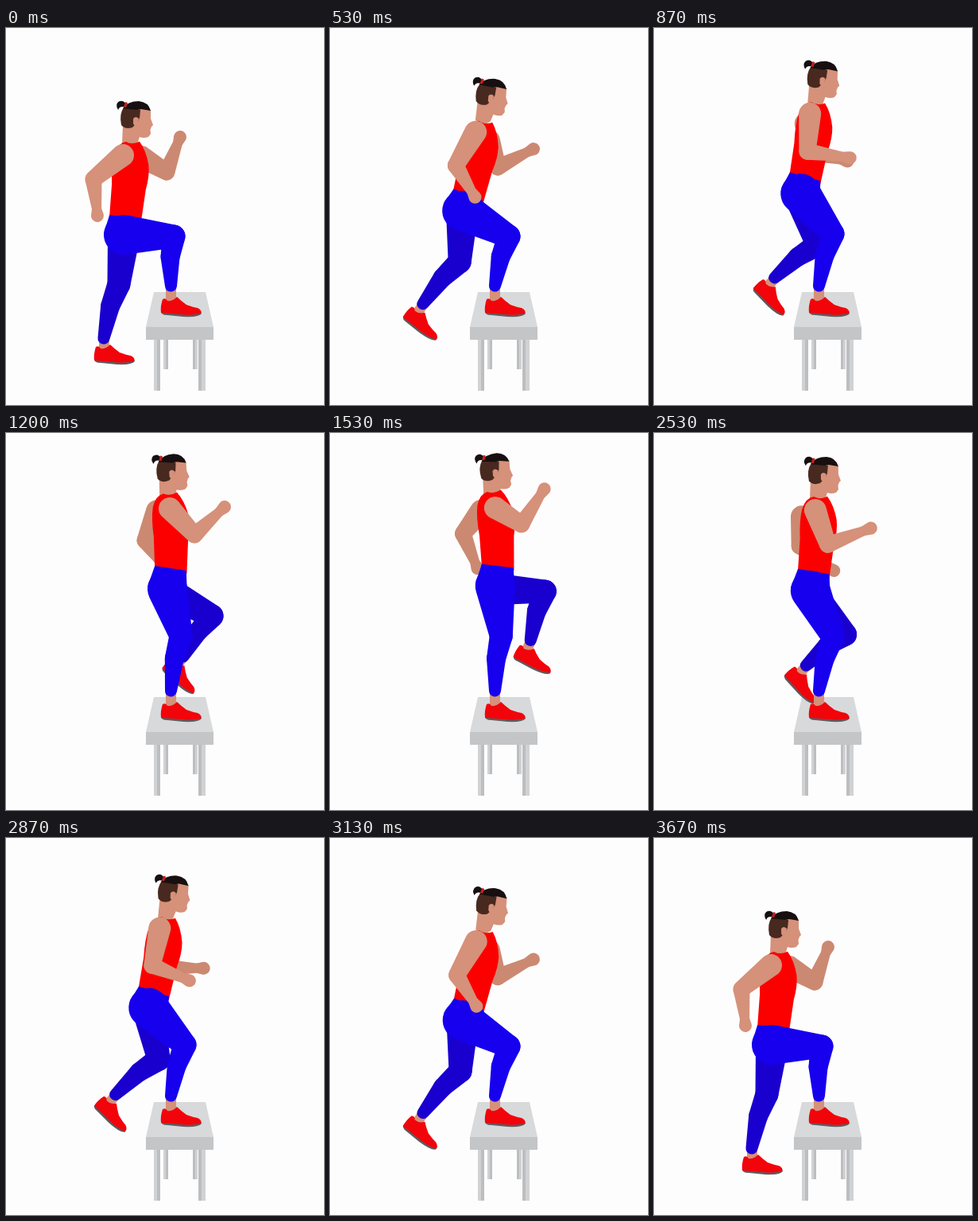
Recreate the animation shown at these times as an HTML page with a canvas. Size 400x474 px, loop 3740 ms.

```html
<!DOCTYPE html>
<html lang="en">
<head>
<meta charset="utf-8">
<title>Step-up exercise</title>
<style>
  html, body { margin: 0; width: 100%; height: 100%; overflow: hidden; background: #fefdfe; }
  canvas { display: block; }
</style>
</head>
<body>
<canvas id="stage" width="400" height="474"></canvas>
<script>
const ctx = document.getElementById('stage').getContext('2d');
const LOOP = 3740, STEP = 200 / 3;
const SKIN = '#d5917a', FAR_SKIN = '#cc8972', BLUE = '#1600ee', FAR_BLUE = '#1a00cf', RED = '#fc0000';

// Joint order: waist, neck, near shoulder/elbow/fist, far shoulder/elbow/fist,
// hip, near knee, far knee, far ankle; then the far foot's angle in degrees.
const stepping = [150,237, 155,142, 147,160, 110,190, 115,236, 170,162, 202,181, 219,137,
                  148,260, 211,262, 142,322, 123,390, 0];
const pushing  = [174,210, 192,113, 183,131, 158,173, 182,213, 200,142, 211,175, 256,152,
                  166,230, 225,262, 163,294, 117,347, 33];
const passing  = [201,174, 205,80, 203,97, 219,140, 273,119, 186,105, 183,142, 226,173,
                  197,198, 225,256, 241,253, 192,292, 42];
const lifting  = [207,170, 202,77, 206,95, 237,128, 275,93, 190,98, 175,135, 196,165,
                  203,196, 220,255, 259,230, 223,281, 38];
const standing = [211,167, 202,76, 208,94, 241,114, 269,69, 190,98, 167,126, 185,171,
                  208,192, 215,255, 271,197, 254,259, 21];
const keys = [
  [0, stepping], [530, pushing], [1085, passing], [1200, lifting], [1620, standing],
  [2010, standing], [2420, lifting], [2530, passing], [3150, pushing], [3670, stepping], [LOOP, stepping]
];

// Monotone cubic interpolation, so that holds stay still.
function slope(k, j) {
  if (k < 1 || k >= keys.length - 1) return 0;
  const rate = i => (keys[i + 1][1][j] - keys[i][1][j]) / (keys[i + 1][0] - keys[i][0]);
  const a = rate(k - 1), b = rate(k);
  return a * b > 0 ? 2 * a * b / (a + b) : 0;
}

function poseAt(t) {
  let k = 0;
  while (k < keys.length - 2 && t >= keys[k + 1][0]) k++;
  const [t0, from] = keys[k], [t1, to] = keys[k + 1], span = t1 - t0, u = (t - t0) / span;
  const ease = u * u * (3 - 2 * u);
  return from.map((v, j) => v + (to[j] - v) * ease
    + span * u * (1 - u) * ((1 - u) * slope(k, j) - u * slope(k + 1, j)));
}

function shape(color, d) {
  ctx.fillStyle = color;
  ctx.fill(new Path2D(d));
}

function local([x, y], angle, draw) {
  ctx.save();
  ctx.translate(x, y);
  ctx.rotate(angle);
  draw();
  ctx.restore();
}

// Chain of tapered capsules through [point, radius] pairs.
function limb(color, ...nodes) {
  ctx.fillStyle = color;
  for (let i = 1; i < nodes.length; i++) {
    const [a, ra] = nodes[i - 1], [b, rb] = nodes[i];
    const dx = b[0] - a[0], dy = b[1] - a[1];
    const dir = Math.atan2(dy, dx);
    const off = Math.acos(Math.max(-1, Math.min(1, (ra - rb) / Math.hypot(dx, dy))));
    ctx.beginPath();
    ctx.arc(...a, ra, dir + off, dir - off + 2 * Math.PI);
    ctx.arc(...b, rb, dir - off, dir + off);
    ctx.fill();
  }
}

function arm(color, shoulder, elbow, fist) {
  const wrist = elbow.map((v, i) => v + (fist[i] - v) * 0.82);
  limb(color, [shoulder, 14], [elbow, 10.5], [wrist, 6], [fist, 8]);
}

function leg(color, hip, hipRadius, knee, ankle) {
  const dx = ankle[0] - knee[0], dy = ankle[1] - knee[1], len = Math.hypot(dx, dy);
  const calf = [knee[0] + dx * 0.42 - dy / len * 3, knee[1] + dy * 0.42 + dx / len * 3];
  limb(color, [hip, hipRadius], [knee, 14.5], [calf, 12], [ankle, 7.5]);
}

function foot(ankle, angle) {
  local(ankle, angle, () => {
    shape(SKIN, 'M-6-2H7V14H-6Z');
    shape('#5b5c60', 'M-12 25Q-13 31-4 31L16 33Q36 34 39 29L38 26Z');
    shape('#f2040b', 'M-10 11Q-6 9-4 13Q3 14 8 8Q13 13 20 18Q28 21 34 22Q40 25 38 29Q25 32 12 30L-12 28Q-13 20-10 11Z');
  });
}

function table() {
  shape('#d1d2d4', 'M198 390h6v39h-6zM235 390h6v39h-6zM186 390h8v66h-8zM242 390h9v66h-9z');
  shape('#bdbec0', 'M201 390h3v39h-3zM235 390h3v39h-3zM190 390h4v66h-4zM242 390h4v66h-4z');
  shape('#d8d9da', 'M186 332H251L261 376H176Z');
  shape('#c4c5c6', 'M176 376H261V392H176Z');
}

function head(neck, angle) {
  local(neck, angle, () => {
    shape(SKIN, 'M-8-22L-9 4Q0 12 10 4L13-5Q18-3 24-5L27-9L26.500-14L28-18L30-20L27-28L27-39L0-42Z');
    shape('#48291f', 'M-7-42L14-39L13-29L10-23L4-17Q-5-14-10-20Q-13-34-7-42Z');
    shape('#170f10', 'M-8-41Q-2-50 12-50Q24-49 27-38L15-40L10-39Z');
    shape('#170f10', 'M-3-45Q-8-53-14-49Q-18-45-14-39Q-12-45-4-42Z');
    shape('#c8201c', 'M-5-49L-2-48L-4-42L-7-43Z');
    shape(SKIN, 'M5-28Q8-32 12-28L10-20Q6-18 5-22Z');
  });
}

function pelvis(waist, hip) {
  const dx = hip[0] - waist[0], dy = hip[1] - waist[1], len = Math.hypot(dx, dy);
  const side = ([x, y], r) => `${x + dy / len * r} ${y - dx / len * r}`;
  shape(BLUE, `M${side(waist, -20)}L${side(waist, 20)}L${side(hip, 25)}L${side(hip, -25)}Z`);
}

function draw(t) {
  const pose = poseAt(t), joints = [];
  for (let i = 0; i < 24; i += 2) joints.push(pose.slice(i, i + 2));
  const [waist, neck, shoulder, elbow, fist, farShoulder, farElbow, farFist,
         hip, knee, farKnee, farAnkle] = joints;
  const lean = Math.atan2(neck[0] - waist[0], waist[1] - neck[1]);

  ctx.fillStyle = '#fefdfe';
  ctx.fillRect(0, 0, 400, 474);
  table();
  arm(FAR_SKIN, farShoulder, farElbow, farFist);
  foot(farAnkle, pose[24] * Math.PI / 180);
  leg(FAR_BLUE, [hip[0], hip[1] + 4], 20, farKnee, farAnkle);
  head(neck, lean * 0.6 - 0.03);
  local(waist, lean, () =>
    shape(RED, 'M-20 8L-19-40Q-21-64-18-78Q-14-92-4-94Q4-90 13-95Q22-84 26-66Q28-52 24-35L20 8Z'));
  foot([207, 330], 0);
  pelvis(waist, hip);
  leg(BLUE, hip, 25, knee, [207.500, 324]);
  arm(SKIN, shoulder, elbow, fist);
}

function tick(now) {
  const step = Math.min(55, Math.floor((now % LOOP + 4) / STEP));
  draw(step * STEP);
  requestAnimationFrame(tick);
}
tick(0);
</script>
</body>
</html>
```
